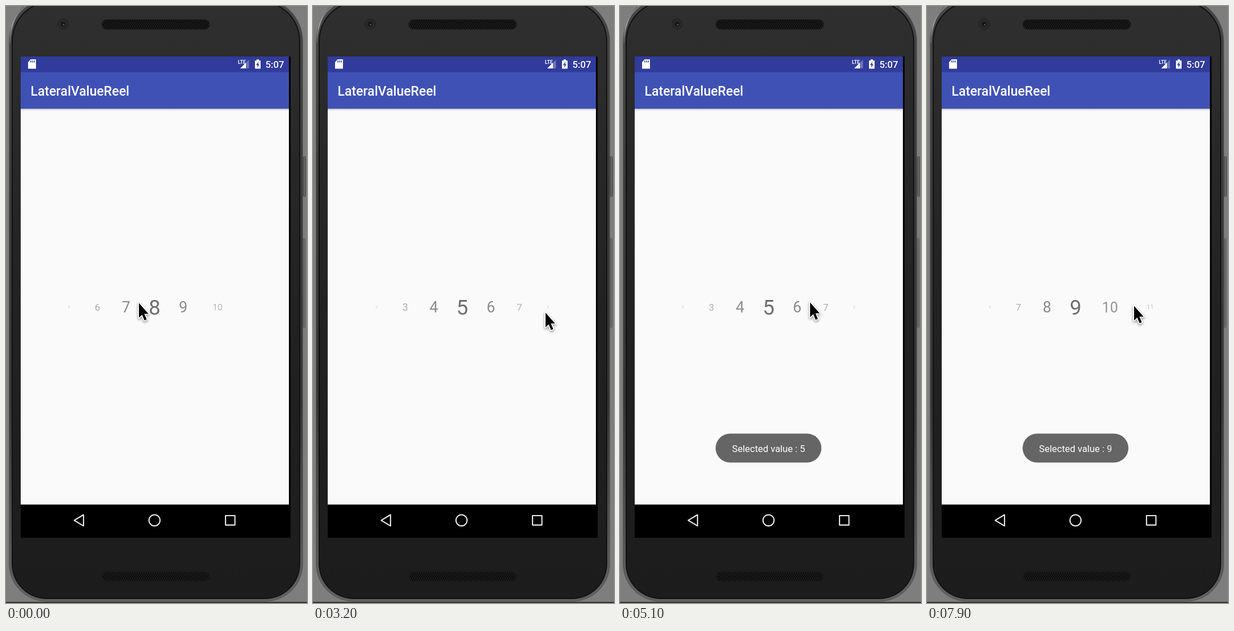
Recreate the animation shown at these times as an HTML page with a canvas. Size 532 by 1052 pixels, loop 8 s.

```html
<!DOCTYPE html>
<html lang="en">
<head>
<meta charset="utf-8">
<title>Number picker</title>
<style>
  html, body { margin: 0; width: 100%; height: 100%; overflow: hidden; background: #7e7e7e; }
  canvas { display: block; width: 100%; height: 100%; }
</style>
</head>
<body>
<canvas id="stage" width="532" height="1052"></canvas>
<script>
const W = 532, H = 1052, LOOP = 8000, STEP = 100;
const FONT = 'Roboto, sans-serif';
const view = document.getElementById('stage').getContext('2d');
const backdrop = document.createElement('canvas');
backdrop.width = W;
backdrop.height = H;
let g = backdrop.getContext('2d');

const clamp = p => Math.max(0, Math.min(1, p));
const mix = (a, b, p) => a + (b - a) * p;
const smooth = p => p * p * (3 - 2 * p);
const easeIn = p => p ** 3;
const easeOut = p => 1 - (1 - p) ** 3;

function rect(x, y, w, h, fill) {
  g.fillStyle = fill;
  g.fillRect(x, y, w, h);
}

function round(x, y, w, h, r, fill, stroke) {
  g.beginPath();
  g.roundRect(x, y, w, h, r);
  g.fillStyle = fill;
  g.fill();
  if (!stroke) return;
  g.strokeStyle = stroke;
  g.lineWidth = 1;
  g.stroke();
}

function circle(x, y, r) {
  g.beginPath();
  g.arc(x, y, r, 0, Math.PI * 2);
}

function disc(x, y, r, fill) {
  circle(x, y, r);
  g.fillStyle = fill;
  g.fill();
}

function poly(points, fill) {
  g.beginPath();
  points.forEach(([x, y]) => g.lineTo(x, y));
  g.closePath();
  if (!fill) return;
  g.fillStyle = fill;
  g.fill();
}

function text(str, x, y, font, fill) {
  g.font = font + ' ' + FONT;
  g.fillStyle = fill;
  g.fillText(str, x, y);
}

function fade(y0, y1, ...colors) {
  const f = g.createLinearGradient(0, y0, 0, y1);
  colors.forEach((c, i) => f.addColorStop(i / (colors.length - 1), c));
  return f;
}

function speaker(y) {
  round(169, y, 191, 17, 8.5, '#1d1d1d', '#171717');
  g.save();
  g.beginPath();
  g.roundRect(170, y + 1, 189, 15, 7.5);
  g.clip();
  for (let row = 0; row < 5; row++) {
    for (let x = 172 + (row % 2) * 2; x < 359; x += 4) disc(x, y + 2.5 + row * 3, 1.25, '#080808');
  }
  g.restore();
}

function drawPhone() {
  rect(0, 0, W, H, '#7e7e7e');
  rect(0, 1050, W, 2, '#333');
  round(525.5, 265.5, 4, 70, 1, '#666', '#444');
  round(525.5, 409.5, 3, 157, 1, '#727272', '#505050');
  round(5.5, -14, 519, 1063, [76, 76, 66, 66], fade(0, H, '#464646', '#3a3a3a', '#363636', '#626262'), '#555');
  g.beginPath();
  g.moveTo(7, 66);
  g.quadraticCurveTo(7, 24, 31, 1);
  g.strokeStyle = fade(66, 0, '#555', '#a2a2a2', '#666');
  g.lineWidth = 2;
  g.stroke();
  round(10, -9, 510, 1054, [71, 71, 62, 62], '#111');
  round(12, -7, 506, 1050, [69, 69, 60, 60], fade(0, H, '#2f2f2f', '#282828', '#222', '#1f1f1f', '#1c1c1c'));

  disc(101, 32, 10, '#252525');
  disc(101, 32, 7.5, '#2a2a2a');
  disc(101, 32, 4.5, '#171717');
  disc(102, 33, 1.5, '#555');
  speaker(24);
  speaker(997);
}

function drawStatus() {
  const bar = '#303b9c';
  rect(26, 89, 474, 27.5, bar);
  poly([[39, 99], [43.5, 94], [53, 94], [53, 110.5], [39, 110.5]], '#fff');
  for (let i = 0; i < 3; i++) rect(43.2 + i * 3, 96, 1.5, 3.5, bar);

  poly([[414, 110], [429.5, 94.5], [429.5, 110]], 'rgba(255,255,255,.3)');
  poly([[414, 110], [424, 100], [424, 110]], '#fff');
  g.fontStretch = 'condensed';
  text('LTE', 410, 102, 'bold 8.5px', '#fff');
  g.fontStretch = 'normal';

  round(440, 96, 10, 14.5, 1, '#fff');
  rect(443, 94, 4, 3, '#fff');
  poly([[446, 98], [442, 104], [444.5, 104], [444, 108.5], [448, 102.5], [445.5, 102.5]], bar);
  text('5:07', 458.5, 109, '500 16.8px', '#fff');
}

function drawNav() {
  rect(26, 878.5, 477, 58.5, '#000');
  g.strokeStyle = '#e8e8e8';
  g.lineWidth = 2.1;
  g.lineJoin = 'round';
  poly([[120.5, 906.3], [137, 896.5], [137, 916.2]]);
  g.stroke();
  circle(262.5, 906.3, 9.8);
  g.stroke();
  g.strokeRect(388, 898, 16.6, 16.6);
}

function drawBackdrop() {
  drawPhone();
  rect(26, 89, 477, 848, '#000');
  rect(26, 180, 474, 700, '#fafafa');
  rect(26, 181, 474, 4, fade(181, 185, '#c4c4c8', '#fafafa'));
  rect(26, 116, 474, 65, '#3f51b5');
  drawStatus();
  text('LateralValueReel', 43.5, 157.5, '500 23.1px', '#fff');
  drawNav();
}

// Pointer moves: start, duration, x, y, easing.
const HOME = [234, 522];
const MOVES = [
  [600, 600, 321, 524, smooth],
  [1500, 300, 259, 532, smooth],
  [1900, 900, 465, 536, easeIn],
  [2800, 400, 410, 539, smooth],
  [4500, 200, 457, 540, smooth],
  [4700, 400, 335, 521, smooth],
  [5900, 400, 230, 522, smooth],
  [6900, 200, 390, 529, smooth],
  [7100, 200, 365, 527, smooth]
];

function pointer(t) {
  return MOVES.reduce(([px, py], [start, span, x, y, ease]) => {
    const p = ease(clamp((t - start) / span));
    return [mix(px, x, p), mix(py, y, p)];
  }, HOME);
}

// The row follows the pointer while dragged, settles on 5, then is flung to 9.
const PRESS = 1900, RELEASE = 2800, FLING = 5900, GRIP = 280.5;
const MID = 262.7, CELL = 50.5, DIGIT = 20.5, SIZE = 37, REACH = 190;

function picked(t) {
  if (t < PRESS) return 8;
  const dragged = 8 - Math.max(0, pointer(Math.min(t, RELEASE))[0] - GRIP) / CELL;
  const settled = mix(dragged, 5, easeOut(clamp((t - RELEASE) / 600)));
  return mix(settled, 9, smooth(clamp((t - FLING) / 400)));
}

// Two-digit cells are one digit wider.
function cellX(n) {
  return n < 10 ? n * CELL : 9.5 * CELL + (n - 9.5) * (CELL + DIGIT);
}

function drawPicker(t) {
  const offset = cellX(picked(t));
  g.textAlign = 'center';
  for (let n = 1; n <= 12; n++) {
    const x = cellX(n) - offset;
    const scale = 1 - Math.abs(x) / REACH;
    if (scale <= 0.05) continue;
    const size = SIZE * scale;
    text(n, MID + x, 530 + size * 0.382, size + 'px', `rgba(0,0,0,${0.56 * scale ** 0.8})`);
  }
  g.textAlign = 'left';
}

function drawToast(t) {
  const alpha = clamp((t - 3620) / 480);
  const swap = clamp((t - 7700) / 250);
  const label = 'Selected value : ';
  g.save();
  g.globalAlpha = alpha;
  round(169, 753.5, 187, 51, 25.5, '#656565');
  g.fontStretch = 'condensed';
  g.font = '19px ' + FONT;
  const size = g.measureText(label + 5).width < 137 ? 19 : 16.7;
  text(label, 198, 786, size + 'px', '#fff');
  const x = 198 + g.measureText(label).width;
  g.globalAlpha = alpha * (1 - swap);
  g.fillText('5', x, 786);
  g.globalAlpha = alpha * swap;
  g.fillText('9', x, 786);
  g.restore();
}

const ARROW = [[1, 1.5], [1, 27.2], [6.5, 21.9], [10.8, 32], [14.7, 30.3], [10.4, 20.4], [17.9, 20.4]];

function drawPointer(t) {
  g.save();
  g.translate(...pointer(t));
  g.lineJoin = 'round';
  poly(ARROW);
  g.shadowColor = 'rgba(0,0,0,.45)';
  g.shadowBlur = 4;
  g.shadowOffsetY = 2;
  g.strokeStyle = '#fff';
  g.lineWidth = 3.4;
  g.stroke();
  g.shadowColor = 'transparent';
  g.fillStyle = '#000';
  g.fill();
  g.restore();
}

function frame() {
  const t = Math.floor((performance.now() % LOOP) / STEP) * STEP;
  g.drawImage(backdrop, 0, 0);
  drawPicker(t);
  drawToast(t);
  drawPointer(t);
  requestAnimationFrame(frame);
}

drawBackdrop();
g = view;
frame();
</script>
</body>
</html>
```
